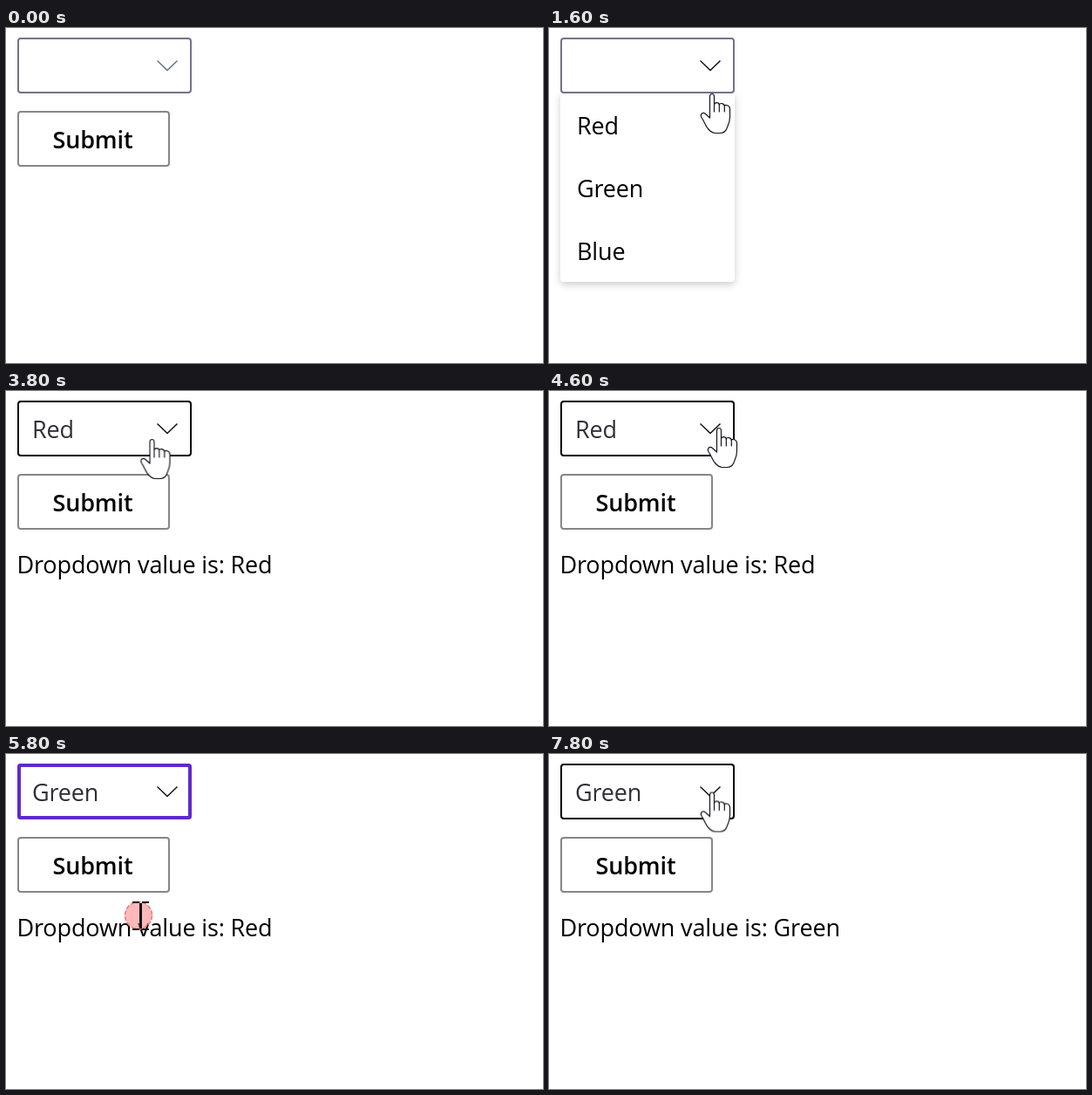
An HTML page for the animation above (8 s loop, 616 by 384 pixels).

```html
<!DOCTYPE html>
<html lang="en">
<head>
<meta charset="utf-8">
<title>Dropdown form</title>
<style>
  html, body { margin: 0; width: 100%; height: 100%; overflow: hidden; background: #fff; }
  svg { display: block; width: 616px; height: 384px; }
  text { font: 27px "Open Sans", "Noto Sans", sans-serif; letter-spacing: -.15px; }

  /* One 200 ms tick is 2.5% of the loop */
  .anim { animation: 8s step-end infinite; }
  .toggle { opacity: 0; }

  .box { fill: #fff; stroke-width: 2; }
  #field { stroke: #757189; animation-name: field; }
  #focus { fill: none; stroke: #6129cf; stroke-width: 4; animation-name: focus; }
  #chevron { fill: none; stroke: #66717f; stroke-width: 1.5; animation-name: chevron; }
  #button { stroke: #868686; animation-name: button; }
  #label { font-weight: 600; animation-name: label; }
  .value { fill: #2f2f38; }
  .red { animation-name: red; }
  .green { animation-name: green; }
  #said-red { animation-name: said-red; }
  #said-green { animation-name: said-green; }

  #menu { animation-name: menu; }
  #sheet { fill: #fff; filter: drop-shadow(0 3px 4px rgba(0, 0, 0, .2)); }
  #first { fill: #fff; animation-name: first; }
  #first-text { animation-name: first-text; }
  #second { fill: #f3f3f3; animation-name: second; }

  #pointer { animation-name: move; }
  #arrow { animation-name: arrow; }
  #hand { animation-name: hand; }
  #beam { animation-name: beam; }
  #press { animation-name: press; }
  .cursor { fill: #fff; stroke: #15151f; stroke-width: 1.2; stroke-linejoin: round; stroke-linecap: round; }

  @keyframes field {
    7.5%, 47.5%, 92.5% { stroke: #000; }
    15%, 60% { stroke: #757189; }
  }
  @keyframes focus {
    27.5%, 72.5% { opacity: 1; }
    40%, 85% { opacity: 0; }
  }
  @keyframes chevron {
    7.5%, 47.5%, 92.5% { stroke: #111; }
    40%, 85% { stroke: #66717f; }
  }
  @keyframes button {
    27.5%, 75% { fill: #f4f4f4; }
    47.5%, 92.5% { fill: #fff; }
  }
  @keyframes label {
    27.5%, 75% { fill: #23222e; }
    47.5%, 92.5% { fill: #000; }
  }
  @keyframes red { 27.5% { opacity: 1; } 72.5% { opacity: 0; } }
  @keyframes green { 72.5% { opacity: 1; } }
  @keyframes said-red { 40% { opacity: 1; } 85% { opacity: 0; } }
  @keyframes said-green { 85% { opacity: 1; } }

  @keyframes menu {
    15%, 60% { opacity: 1; }
    27.5%, 72.5% { opacity: 0; }
  }
  @keyframes first { 22.5% { fill: #f3f3f3; } 60% { fill: #e9e9e9; } }
  @keyframes first-text { 22.5% { fill: #2f2f38; } }
  @keyframes second { 70% { opacity: 1; } }

  @keyframes arrow { 5% { opacity: 1; } 7.5% { opacity: 0; } }
  @keyframes hand {
    7.5%, 75% { opacity: 1; }
    72.5% { opacity: 0; }
  }
  @keyframes beam { 72.5% { opacity: 1; } 75% { opacity: 0; } }
  @keyframes press {
    15%, 27.5%, 40%, 60%, 72.5%, 85% { opacity: 1; }
    17.5%, 30%, 42.5%, 62.5%, 75%, 87.5% { opacity: 0; }
  }
  @keyframes move {
    5% { transform: translate(274px, 3px); }
    7.5% { transform: translate(205px, 32px); }
    10% { transform: translate(189px, 46px); }
    15% { transform: translate(187px, 46px); animation-timing-function: steps(2); }
    20% { transform: translate(187px, 75px); animation-timing-function: steps(3); }
    27.5% { transform: translate(148px, 116px); }
    32.5% { transform: translate(145.5px, 118px); }
    35% { transform: translate(142.5px, 119px); }
    45% { transform: translate(150px, 100px); }
    47.5% { transform: translate(167.5px, 55px); animation-timing-function: steps(2); }
    52.5% { transform: translate(207.5px, 44px); }
    57.5% { transform: translate(195px, 42px); }
    60% { transform: translate(184px, 41px); }
    62.5% { transform: translate(182.5px, 40px); animation-timing-function: steps(3); }
    70% { transform: translate(154px, 183px); }
    72.5% { transform: translate(152px, 185px); }
    75% { transform: translate(150px, 146px); animation-timing-function: steps(2); }
    80% { transform: translate(143px, 126px); }
    90% { transform: translate(150px, 108px); }
    92.5% { transform: translate(165px, 62px); animation-timing-function: steps(2); }
    97.5% { transform: translate(187px, 43.5px); }
  }
</style>
</head>
<body>
<svg viewBox="0 0 616 384">
  <rect id="button" class="box anim" x="14" y="96" width="173" height="62" rx="3"/>
  <text id="label" class="anim" x="53.5" y="138">Submit</text>
  <text id="said-red" class="anim toggle" x="12.5" y="209">Dropdown value is: Red</text>
  <text id="said-green" class="anim toggle" x="12.5" y="209">Dropdown value is: Green</text>

  <g id="menu" class="anim toggle">
    <path id="sheet" d="M13 75H213V287a4 4 0 0 1-4 4H17a4 4 0 0 1-4-4Z"/>
    <rect id="first" class="anim" x="13" y="75" width="200" height="72"/>
    <rect id="second" class="anim toggle" x="13" y="147" width="200" height="72"/>
    <text id="first-text" class="anim" x="32" y="122">Red</text>
    <text x="32" y="194">Green</text>
    <text x="32" y="266">Blue</text>
  </g>

  <rect id="field" class="box anim" x="14" y="12" width="198" height="62" rx="3"/>
  <rect id="focus" class="anim toggle" x="15" y="13" width="196" height="60" rx="2"/>
  <text class="value red anim toggle" x="30" y="54">Red</text>
  <text class="value green anim toggle" x="30" y="54">Green</text>
  <path id="chevron" class="anim" d="M173.5 37.5L185 48.5L196.5 37.5"/>

  <g id="pointer" class="anim">
    <circle id="press" class="anim toggle" r="15.5" fill="#ff8080" fill-opacity=".55" stroke="#f07878" stroke-width="1.5" stroke-dasharray="5 2"/>
    <path id="arrow" class="cursor anim toggle" d="M0 0V32L7.5 25L12 36L17 34L12.5 23.5H23Z"/>
    <g id="hand" class="cursor anim toggle">
      <path d="M-2.5 3.5C-2.5-.5 2.5-.5 2.5 3.5V13C3 9.8 8 9.8 8.3 13C9 10.7 14 11 14.3 14.5C15 12.7 20.5 13 20.5 18V27C20.5 34 18 37 17 40C15.5 44 13 45.5 9 45.5H4C0 45.5-2.5 43-5 40C-8 36-9 32-12 27.5C-14 24-10.5 20.5-7.5 23.5L-2.5 28Z"/>
      <path d="M2.5 13V21M8.3 13V21M14.3 14.5V21" fill="none"/>
    </g>
    <g id="beam" class="anim toggle" fill="none" stroke="#111">
      <path d="M2.5-14V15" stroke-width="3"/>
      <path d="M-7-15H1M4-15H12M-7 16H1M4 16H12" stroke-width="2"/>
    </g>
  </g>
</svg>
</body>
</html>
```
